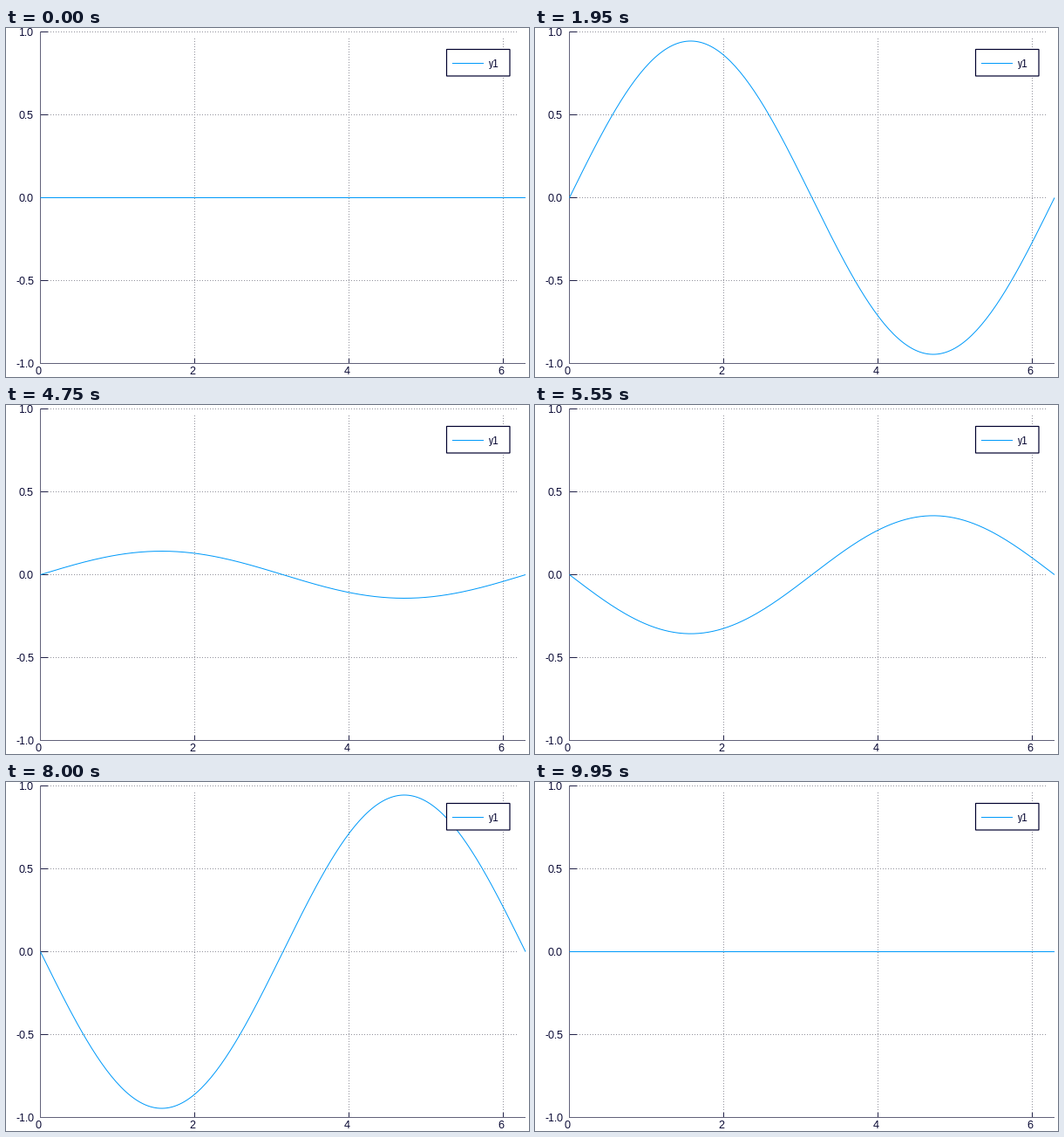
Animation, 600 px wide and 400 px high, one loop 10000 ms. Source, as a matplotlib script:

```python
import math
import numpy as np
import matplotlib.pyplot as plt
from matplotlib.animation import FuncAnimation
from matplotlib.patches import Rectangle

W, H, DPI = 600, 400, 100
PX = 72 / DPI  # one pixel in points
FRAMES, INTERVAL = 200, 50
NAVY, BLUE = "#00002d", "#009afa"
GRID, AXIS, TICK = "#94949e", "#62627a", "#24244a"
DOTS = (0, (1, 2))

plt.rcParams.update({
    "font.family": "Liberation Sans",
    "text.hinting": "native",
    "text.hinting_factor": 1,
})
fig = plt.figure(figsize=(W / DPI, H / DPI), dpi=DPI, facecolor="white")
ax = fig.add_axes([0, 0, 1, 1])
ax.set_xlim(0, W)
ax.set_ylim(H, 0)
ax.axis("off")


def sx(x):
    return 39.5 + 88.57 * x


def sy(y):
    return 194.5 - 190.4 * y


def crisp(p):
    """Centre of the pixel that holds p."""
    return math.floor(p) + 0.5


def line(xs, ys, color, z, **kw):
    return ax.plot(xs, ys, color=color, zorder=z, lw=PX, snap=False,
                   solid_capstyle="butt", dash_capstyle="butt", **kw)[0]


def label(x, y, text, ha):
    ax.text(x, y, text, ha=ha, va="baseline", color=NAVY,
            fontsize=12 * PX, zorder=6)


LEFT, BOTTOM, RIGHT = sx(0), crisp(sy(-1)), sx(2 * np.pi)

for v in (-1, -0.5, 0, 0.5, 1):
    y = crisp(sy(v))
    if v > -1:
        line([48, 587], [y, y], GRID, 1, ls=DOTS)
        line([LEFT, 48], [y, y], TICK, 2)
    label(32, y + 4.5, f"{v:.1f}", "right")

for v in (0, 2, 4, 6):
    x = crisp(sx(v))
    if v:
        line([x, x], [379, 10], GRID, 1, ls=DOTS)
        line([x, x], [379, BOTTOM], TICK, 2)
    label(x - 6, 397, str(v), "left")

line([LEFT, LEFT], [4, 385], AXIS, 2)
line([39, RIGHT], [BOTTOM, BOTTOM], AXIS, 2)

# Legend covers the curve
ax.add_patch(Rectangle((505.5, 24.5), 72.5, 30.5, fc="white", ec=NAVY,
                       lw=1.2 * PX, zorder=4, snap=False))
line([512, 548], [40.5, 40.5], BLUE, 5)
label(554, 45, "y1", "left")

t = np.linspace(0, 2 * np.pi, 200)
curve = line(sx(t), sy(0 * t), BLUE, 3)


def update(i):
    amp = np.sin(2 * np.pi * i / (FRAMES - 1))
    curve.set_ydata(sy(amp * np.sin(t)))
    return [curve]


anim = FuncAnimation(fig, update, frames=FRAMES, interval=INTERVAL,
                     repeat=True, repeat_delay=0, blit=False)
plt.show()
```
